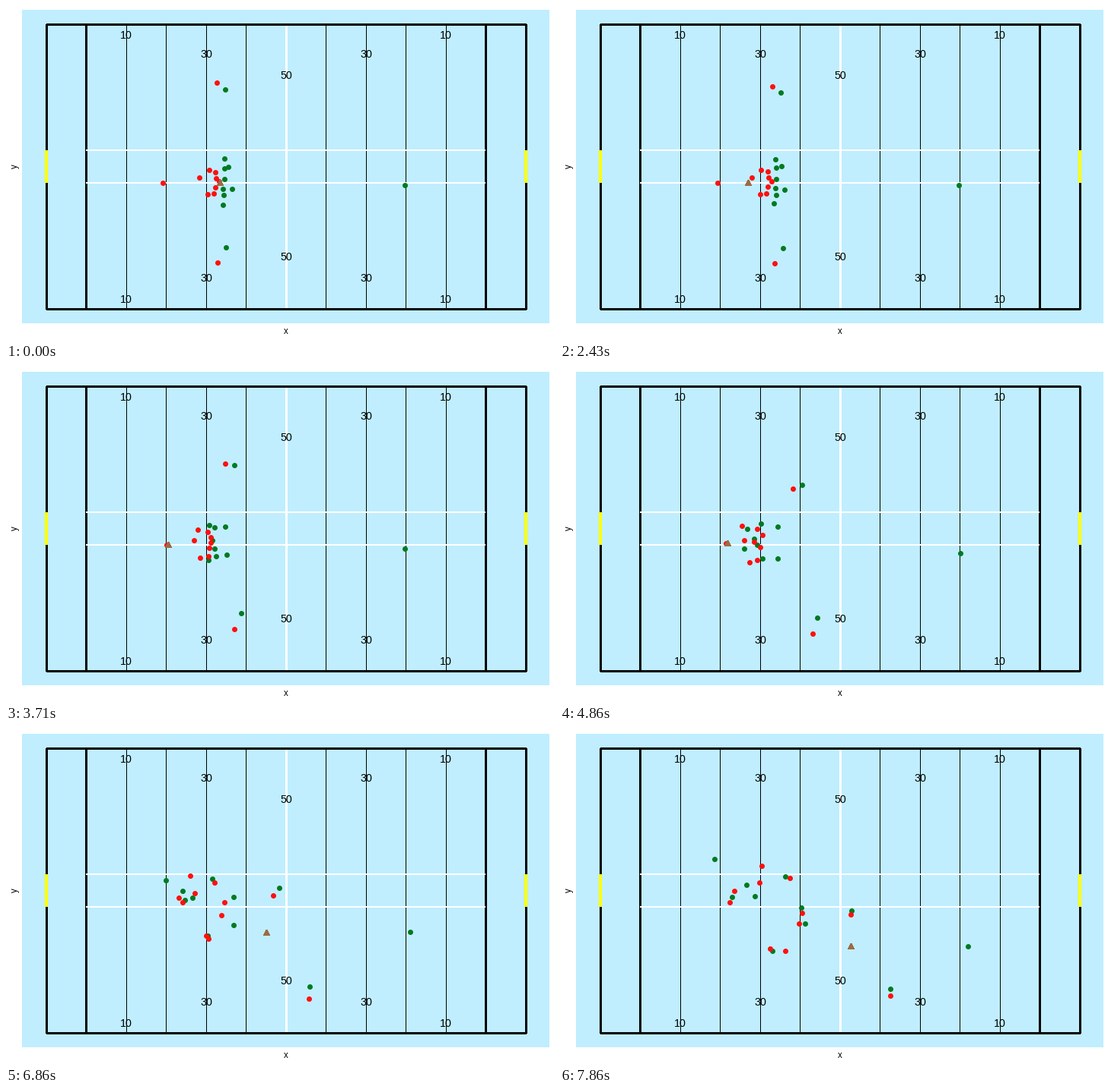
A matplotlib script for the animation above (8 s loop, 720 by 440 pixels).

```python
import numpy as np
import matplotlib.pyplot as plt
from matplotlib.animation import FuncAnimation

W, H, DPI = 720, 440, 80
PX = 72 / DPI  # points per pixel
FPS, FRAMES = 7, 56
PANEL, RED, GREEN, BROWN = "#c0eeff", "#ff1010", "#007a20", "#9c6b44"

# Seconds: players set off, reach their waypoint, reach the end
T_GO, T_MID, T_END = 1.57, 5.86, 7.86
T_PASS, PASS_TIME, T_KICK = 1.43, 2.1, 4.86

plt.rcParams["font.family"] = "Liberation Sans"
fig = plt.figure(figsize=(W / DPI, H / DPI), dpi=DPI, facecolor="white")
ax = fig.add_axes([0, 0, 1, 1])
ax.set(xlim=(0, W), ylim=(H, 0))
ax.axis("off")


def run(t, start, mid, end):
    """Cubic path from rest at start, through mid, to end."""
    start, mid, end = (np.array(p, float) for p in (start, mid, end))
    t_mid, t_end = T_MID - T_GO, T_END - T_GO
    to_mid, to_end = (mid - start) / t_mid**2, (end - start) / t_end**2
    jerk = (to_end - to_mid) / (t_end - t_mid)
    s = max(t - T_GO, 0)
    return start + s**2 * (to_mid + jerk * (s - t_mid))


# Each runner: start, waypoint, end
FLY_HALF = ((206, 233), (223, 227), (229, 212))
RED_TEAM = [
    FLY_HALF,
    ((277, 101), (326, 189), (382, 243)),  # wings
    ((278, 338), (364, 353), (434, 350)),
    ((254, 226), (242, 223), (262, 201)),  # scrum half
    ((267, 216), (235, 201), (265, 179)),  # pack
    ((275, 219), (261, 207), (302, 195)),
    ((276, 227), (271, 221), (318, 241)),
    ((280, 231), (243, 228), (223, 227)),
    ((275, 239), (268, 238), (314, 255)),
    ((273, 247), (258, 260), (276, 288)),
    ((265, 248), (252, 264), (296, 291)),
]
GREEN_TEAM = [
    ((524, 236), (528, 253), (536, 285)),  # full back
    ((288, 110), (337, 180), (383, 238)),  # wings
    ((289, 318), (367, 334), (434, 341)),
    ((292, 212), (289, 212), (317, 234)),  # second line
    ((297, 241), (288, 255), (322, 255)),
    ((287, 201), (234, 214), (245, 204)),  # pack
    ((287, 214), (262, 200), (296, 193)),
    ((287, 228), (246, 223), (256, 219)),
    ((285, 241), (246, 229), (226, 220)),
    ((286, 249), (262, 258), (279, 291)),
    ((285, 262), (224, 220), (203, 170)),
]


def ball_at(t):
    """Passed back to the fly half, carried, then kicked with drag."""
    carried = run(min(t, T_KICK), *FLY_HALF) + (2, 0)
    share = np.clip((t - T_PASS) / PASS_TIME, 0, 1)
    held = (1 - share) * np.array([281, 233]) + share * carried
    s = max(t - T_KICK, 0)
    return held + (75 * s - 7 * s**2, 18 * s)


def line(x0, y0, x1, y1, color, width):
    ax.plot([x0, x1], [y0, y1], color=color, lw=width * PX,
            solid_capstyle="butt", antialiased=False, zorder=1)


def label(x, y, text, size=14.3, **kw):
    ax.text(x, y, text, size=size * PX, ha="center", va="center", zorder=2, **kw)


def draw_field():
    ax.add_patch(plt.Rectangle((21, 5), 693, 413, color=PANEL, lw=0, zorder=0))
    for i in range(1, 10):
        x = int(105.5 + 52.5 * i)
        if i != 5:
            line(x, 24, x, 399, "black", 1)
    line(368, 24, 368, 399, "white", 3)
    for x in (53, 105, 630, 683):
        line(x, 24, x, 399, "black", 3)
    for y in (24, 399):
        line(53, y, 683, y, "black", 3)
    for y in (190, 233):
        line(105, y, 630, y, "white", 2)
    for x in (53, 683):
        line(x, 190, x, 233, "yellow", 4)
    for offset, top, bottom, mark in ((210, 39, 387, "10"), (105, 64, 359, "30"),
                                      (0, 92, 331, "50")):
        for x in {368 - offset, 368 + offset}:
            label(x, top, mark)
            label(x, bottom, mark)
    label(368, 429.5, "x", 11.5)
    label(12, 211, "y", 11.5, rotation=90)


def dots(color, zorder):
    return ax.scatter([], [], s=(7 * PX) ** 2, c=color, linewidths=0,
                      antialiased=False, zorder=zorder)


draw_field()
teams = [(dots(GREEN, 3), GREEN_TEAM), (dots(RED, 4), RED_TEAM)]
BALL_SHAPE = np.array([(0, -4.5), (4, 3), (-4, 3)])
ball = plt.Polygon(BALL_SHAPE, color=BROWN, lw=0, antialiased=False, zorder=5)
ax.add_patch(ball)


def update(frame):
    t = frame / FPS
    for marks, team in teams:
        marks.set_offsets(np.round([run(t, *runner) for runner in team]))
    ball.set_xy(np.round(ball_at(t)) + 0.5 + BALL_SHAPE)
    return [marks for marks, _ in teams] + [ball]


anim = FuncAnimation(fig, update, frames=FRAMES, init_func=lambda: update(0),
                     interval=1000 / FPS, repeat=True, repeat_delay=0)
plt.show()
```
